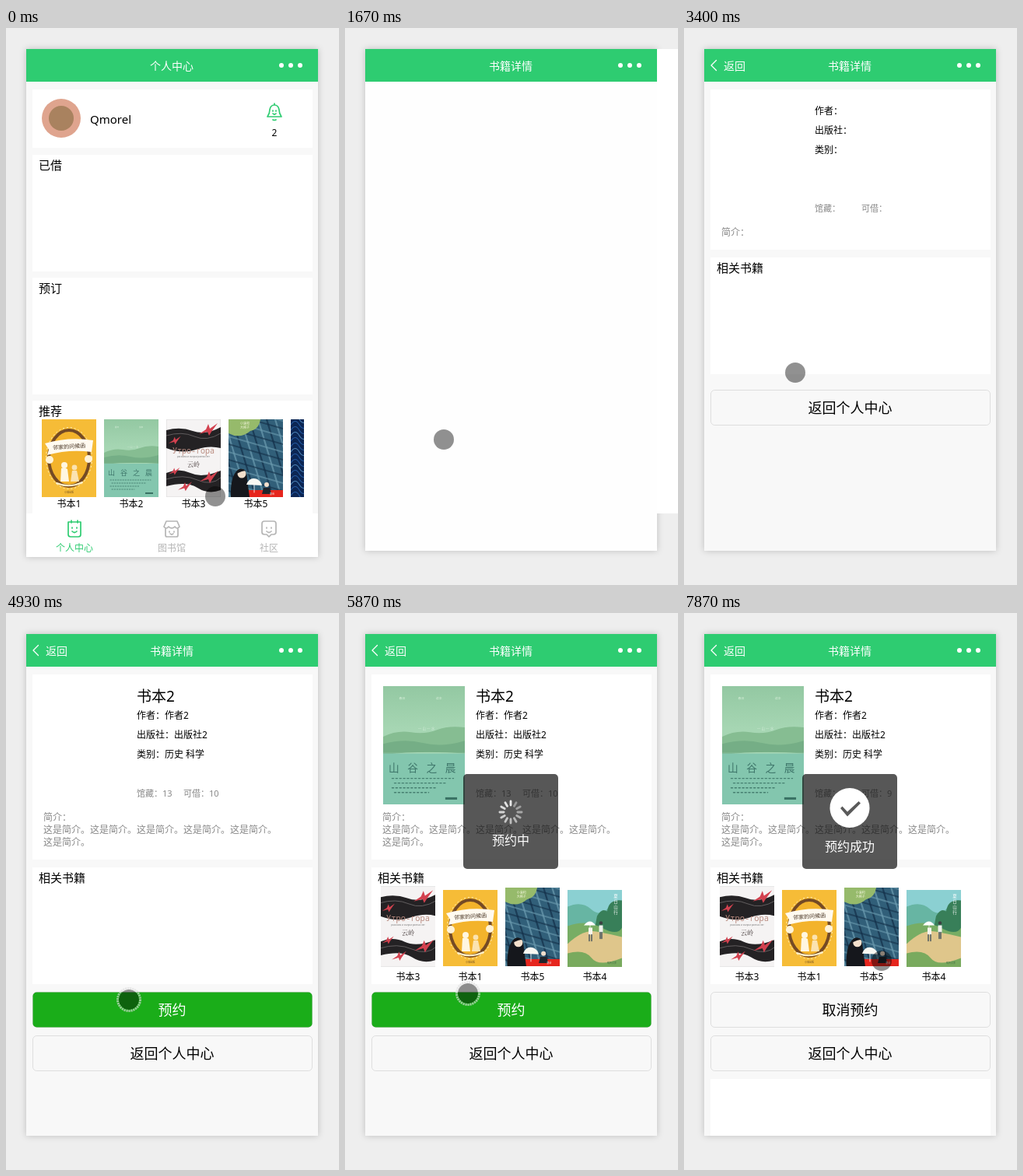
These frames come from a looping animation (428x716 px, 8 s). An HTML page:

```html
<!DOCTYPE html>
<html lang="zh-CN">
<head>
<meta charset="utf-8">
<title>图书馆</title>
<style>
html, body { margin: 0; width: 100%; height: 100%; overflow: hidden; background: #eee; }
svg { display: block; width: 428px; height: 716px; font-family: "Noto Sans", "Noto Sans CJK SC", "Noto Sans CJK", sans-serif; }
.frame { filter: drop-shadow(0 0 4px rgba(0,0,0,.2)); }
</style>
</head>
<body>
<svg id="stage" viewBox="0 0 428 716"></svg>
<script>
const LOOP = 8000;
const GREEN = '#2ecc71';
const stage = document.getElementById('stage');

const rect = (x, y, w, h, fill, more = '') => `<rect x="${x}" y="${y}" width="${w}" height="${h}" fill="${fill}" ${more}/>`;
const circle = (x, y, r, fill, more = '') => `<circle cx="${x}" cy="${y}" r="${r}" fill="${fill}" ${more}/>`;
const path = (d, fill, more = '') => `<path d="${d}" fill="${fill}" ${more}/>`;
const line = (d, color, w, more = '') => path(d, 'none', `stroke="${color}" stroke-width="${w}" stroke-linecap="round" stroke-linejoin="round" ${more}`);
const group = (id, body, more = '') => `<g id="${id}" ${more}>${body}</g>`;
// Text placed by the vertical centre of its glyphs
const text = (x, cy, size, s, fill = '#000', more = '') =>
  `<text x="${x}" y="${cy + size * 0.37}" font-size="${size}" fill="${fill}" ${more}>${s}</text>`;
const mid = (x, cy, size, s, fill, more = '') => text(x, cy, size, s, fill, `text-anchor="middle" ${more}`);
const card = (y, h) => rect(34, y, 360, h, '#fff');
const repeat = (n, f) => Array.from({ length: n }, (_, i) => f(i)).join('');

const cover = (n, body) =>
  `<symbol id="cover${n}" viewBox="0 0 70 100" preserveAspectRatio="xMidYMid slice">${body}</symbol>`;
const book = (n, x, y, w = 70, h = 100) => `<use href="#cover${n}" x="${x}" y="${y}" width="${w}" height="${h}"/>`;

const bird = (x, y, s) => path('M0 9L9 3L12 -4L14 2L24 -5L16 6L13 11L11 6Z', '#d3414f', `transform="translate(${x} ${y}) scale(${s})"`);

const covers =
  cover(1,
    rect(0, 0, 70, 100, '#f6bc37') +
    '<ellipse cx="35" cy="50" rx="26" ry="36" fill="#f3b32b" stroke="#744a25" stroke-width="4"/>' +
    '<ellipse cx="35" cy="50" rx="29.5" ry="39.5" fill="none" stroke="#fff1c8" stroke-width="1" stroke-dasharray="2 3"/>' +
    circle(10, 52, 5, '#fff3d8') + circle(60, 51, 5, '#fff3d8') +
    path('M4 31Q35 22 66 27L64 42Q35 38 7 46L9 39Z', '#fffaf0') +
    mid(35, 35, 7, '邻家的问候函', '#43301f', 'transform="rotate(-4 35 35)"') +
    circle(29, 59, 4, '#fff6e0') + path('M25 63Q29 61 33 64L35 80H24Z', '#fff6e0') +
    circle(42, 62, 3.4, '#fbe3b0') + path('M39 66H45L48 80H37Z', '#fbe3b0') +
    line('M19 82Q35 89 52 81', '#fff1c8', 2) +
    mid(35, 94, 3, '小城出版', '#6b4a20')) +
  cover(2,
    rect(0, 0, 70, 100, 'url(#mist)') +
    path('M0 43Q12 37 24 39T46 37T70 35V56H0Z', '#86bd92') +
    path('M0 49Q18 44 34 48T70 46V57Q34 54 0 58Z', '#6faa82', 'opacity=".75"') +
    rect(0, 57, 70, 43, '#83c6ae') +
    text(14, 10, 2.6, '春日', '#d8efda') + text(45, 10, 2.6, '读本', '#d8efda') +
    mid(37, 36, 3, '一 山 一 水', '#d0ead6') +
    mid(37, 69, 9, '山谷之晨', '#3f776b', 'letter-spacing="7"') +
    repeat(4, i => line(`M${8 + i % 2 * 2} ${78 + i * 4}H${60 - i * 7}`, '#467f70', 0.9, 'stroke-dasharray="1.4 1.8"')) +
    rect(53, 94, 10, 2, '#397163')) +
  cover(3,
    rect(0.3, 0.3, 69.4, 99.4, '#f5f3f3', 'stroke="#ddd" stroke-width=".6"') +
    path('M0 14Q18 9 34 15T70 10V37Q55 33 38 39T0 37Z', '#242224') +
    path('M0 69Q16 62 31 69T70 66V91Q54 97 40 88T0 86Z', '#242224') +
    line('M0 21Q20 15 36 22T70 18M0 77Q22 70 40 78T70 75', '#706b6c', 0.8) +
    bird(42, 10, 1) + bird(3, 25, 0.65) + bird(43, 71, 1) + bird(15, 84, 0.75) + bird(3, 65, 0.6) +
    mid(35, 40, 10, 'Утро-гора', '#b98b7f', 'font-family="Noto Sans Mono, monospace"') +
    mid(35, 48, 2.8, 'рассказы и очерки разных лет', '#777') +
    mid(35, 58, 8, '云岭', '#453b3b', 'font-family="Noto Serif, Noto Serif CJK SC, serif"')) +
  cover(5,
    rect(0, 0, 70, 100, '#315f79') +
    repeat(13, i => line(`M${i * 11 - 50} 0L${i * 11 - 20} 100`, i % 2 ? '#132f49' : '#6c9caf', 2.2, 'opacity=".7"')) +
    repeat(14, i => line(`M0 ${i * 10 - 18}L70 ${i * 10 + 2}`, i % 2 ? '#132f49' : '#6c9caf', 2, 'opacity=".6"')) +
    path('M0 0H41Q39 13 28 15Q15 26 0 18Z', '#96ba6b') +
    text(15, 6, 4, '小满和', '#f3f6dc') + text(15, 11, 4, '大格子', '#f3f6dc') +
    rect(24, 91, 46, 9, '#e6251d') +
    path('M3 100Q2 73 12 65Q23 60 24 77L27 100Z', '#15171c') +
    circle(17, 70, 5.5, '#f2dfcc') + path('M10 70Q12 60 22 66L17 67Z', '#15171c') +
    path('M23 84Q27 73 37 77Q42 80 43 85Z', '#f8f8f3') + line('M33 84V94', '#fff', 0.8) +
    circle(49, 84, 3, '#f2dfcc') + path('M45 88H53L55 96H43Z', '#20242b') +
    mid(56, 96, 3, '童话', '#fff')) +
  cover(4,
    rect(0, 0, 70, 100, '#8bd0d2') +
    path('M0 22Q18 14 30 25T53 23L70 14V59H0Z', '#67b5a3') +
    path('M38 34Q44 23 51 28Q53 12 70 14V65H32Z', '#387f59') +
    path('M0 47Q24 38 44 49T70 49V70H0Z', '#77ad64') +
    path('M0 70Q20 51 37 54T70 61V100H0Z', '#dfc68b') +
    path('M0 82Q22 76 31 88T70 88V100H0Z', '#79aa5e') +
    path('M21 46Q29 36 36 46Z', '#fff') + line('M29 45V50', '#fff', 0.7) +
    rect(27, 49, 5, 9, '#f7f6ee') + line('M28 58V66M31 58V66', '#41515d', 1.4) +
    circle(43, 43, 2.2, '#3b4242') + rect(40.5, 46, 5, 9, '#eef1ec') + line('M42 55V63M44 55V63', '#41515d', 1.4) +
    repeat(4, i => mid(62, 8 + i * 7, 5.5, '夏日山行'[i], '#fff')) +
    mid(57, 94, 3, '晴天文库', '#446b43')) +
  cover(6,
    rect(0, 0, 70, 100, '#0c2654') +
    repeat(16, i => line(`M0 ${i * 7}Q6 ${i * 7 - 9} 11 ${i * 7}T24 ${i * 7}`, i % 3 ? '#245aa3' : '#4c83b7', 1.1)));

const frame = h => rect(26, 27, 375, h, '#f8f8f8', 'class="frame"');
const tab = (x, label, color, icon) =>
  `<g transform="translate(${x} 644)">${line(icon, color, 1.7)}</g>` + mid(x, 669, 12, label, color);
const smile = 'M-3 -2V-1M3 -2V-1M-3 3Q0 6 3 3';

const home = frame(653) +
  card(79, 75) + card(163, 150) + card(321, 150) + card(479, 150) +
  circle(71, 116, 25, '#dfa48e') + circle(71, 116, 16, '#a9825f') +
  text(108, 117, 15, 'Qmorel') +
  `<g transform="translate(345 108)">` +
    line('M-9 6Q-6 2 -6 -3Q-5 -9 0 -9Q5 -9 6 -3Q6 2 9 6ZM0 -9V-11M-2 10Q0 11 2 10M-2 -2V-1M2 -2V-1M-2 2Q0 4 2 2', GREEN, 1.7) + '</g>' +
  mid(345, 135, 12, '2') +
  text(42, 176, 15, '已借') + text(42, 334, 15, '预订') + text(42, 492, 15, '推荐') +
  `<g clip-path="url(#row)">` + [1, 2, 3, 5, 6].map((n, i) => book(n, 46 + i * 80, 503)).join('') + '</g>' +
  [1, 2, 3, 5].map((n, i) => mid(81 + i * 80, 612, 12, '书本' + n)).join('') +
  rect(26, 624, 375, 56, '#fff') +
  tab(88, '个人中心', GREEN, 'M-8 -9H8V7Q8 10 5 10H-5Q-8 10 -8 7ZM-4 -11V-8M4 -11V-8M-3 -2V-1M3 -2V-1M-3 3Q0 6 3 3') +
  tab(213, '图书馆', '#b5b5b5', 'M-7 -10H7L10 -3Q7 1 4 -3Q0 1 -4 -3Q-7 1 -10 -3ZM-8 0V8Q-8 10 -6 10H6Q8 10 8 8V0M-3 3V4M3 3V4M-2 6Q0 8 2 6') +
  tab(338, '社区', '#b5b5b5', 'M-6 -10H6Q9 -10 9 -7V4Q9 7 6 7H3L0 10L-3 7H-6Q-9 7 -9 4V-7Q-9 -10 -6 -10Z' + smile);

const button = (y, label, fill = '#f8f8f8', ink = '#000') =>
  rect(34.5, y + 0.5, 359, 45, fill, 'rx="5" stroke="#000" stroke-opacity=".1"') + mid(213.5, y + 23.5, 18, label, ink);
const info = (y, who, press, kind) =>
  text(168, y, 12, '作者：' + who) + text(168, y + 25, 12, '出版社：' + press) + text(168, y + 50, 12, '类别：' + kind);
const GREY = '#888';
const page = rect(26, 69, 375, 603, '#f8f8f8');
const intro = '这是简介。';

const empty = page + card(79, 206) + info(106.5, '', '', '') +
  text(168, 232, 11, '馆藏：', GREY) + text(228, 232, 11, '可借：', GREY) + text(48, 263, 12, '简介：', GREY) +
  card(295, 150) + text(42, 308, 15, '相关书籍') + button(465, '返回个人中心');

const loaded = page + card(79, 238) +
  text(168, 107, 19, '书本2') + info(131.5, '作者2', '出版社2', '历史 科学') +
  text(168, 232, 11, '馆藏：13', GREY) + text(228, 232, 11, '可借：<tspan id="left"></tspan>', GREY) +
  text(48, 263, 12, '简介：', GREY) + text(48, 279, 12, intro.repeat(5), GREY) + text(48, 295, 12, intro, GREY) +
  group('mainCover', book(2, 49, 94, 105, 152)) +
  card(327, 150) + text(42, 340, 15, '相关书籍') +
  group('related',
    book(3, 46, 351, 70, 104) + book(1, 126, 356, 70, 98) + book(5, 206, 353, 70, 101) + book(4, 286, 356, 70, 99) +
    [3, 1, 5, 4].map((n, i) => mid(81 + i * 80, 468, 12, '书本' + n)).join('')) +
  group('reserve', button(487, '预约', '#1aad19', '#fff')) +
  group('cancel', button(487, '取消预约')) +
  button(543, '返回个人中心') +
  group('extra', card(599, 73));

const shade = i => i ? 144 + i * 7.5 : 233;
const blades = repeat(12, i => {
  const c = shade(i);
  return rect(-1.4, -15.5, 2.8, 8, `rgb(${c},${c},${c})`, `rx="1.4" transform="rotate(${i * 30})"`);
});

const toast = rect(152, 207, 122, 122, '#111', 'rx="5" opacity=".7"') +
  group('busy', `<g transform="translate(213 256)">${group('spinner', blades)}</g>` + mid(213, 292, 16, '预约中', '#fff')) +
  group('done', circle(213, 250.5, 25.5, '#fff') +
    path('M201 251L203.5 248.5L210 255.5L224.5 242L227 244.5L210 261.5Z', '#5a5a5a') + mid(213, 300.5, 16, '预约成功', '#fff'));

stage.innerHTML =
  `<defs><linearGradient id="mist" x2="0" y2="1"><stop stop-color="#93c8a2"/><stop offset=".36" stop-color="#a6d6b3"/></linearGradient>
  <clipPath id="row">${rect(46, 490, 337, 130, '#000')}</clipPath>${covers}</defs>` +
  rect(0, 0, 428, 716, '#eee') +
  group('home', home) +
  group('detail', frame(645) + rect(26, 69, 375, 603, '#fefefe') + group('slide', rect(401, 27, 375, 597, '#fff')) +
    group('empty', empty) + group('loaded', loaded)) +
  rect(26, 27, 375, 42, GREEN) +
  group('back', line('M41.5 41.5L35 48L41.5 54.5', '#fff', 1.3) + text(51, 48.5, 14, '返回', '#fff')) +
  mid(213, 48.5, 14, '<tspan id="title"></tspan>', '#fff') +
  repeat(3, i => circle(354 + i * 12, 48, 3, '#fff')) +
  group('toast', toast) +
  group('cursor', circle(0, 0, 13, '#000', 'opacity=".43"') +
    group('ring', circle(0, 0, 14.5, 'none', 'stroke="#ddd" stroke-width="3" stroke-dasharray="2.2 .8" opacity=".65"')));

const ui = {};
stage.querySelectorAll('g[id], tspan[id]').forEach(e => ui[e.id] = e);

// Pointer path: time, x, y
const track = [
  [0, 269, 602], [20, 269, 602], [330, 118, 525], [640, 118, 525], [670, 120, 528], [730, 127, 529],
  [1670, 127, 529], [2470, 138, 434], [3340, 138, 434], [3400, 143, 443], [3720, 167, 478], [4070, 158, 497],
  [5200, 158, 497], [5530, 158, 489], [6400, 158, 489], [6470, 158, 482], [7340, 158, 482],
  [7630, 385, 85], [7870, 254, 447], [LOOP, 254, 447]
];
const clamp = v => Math.min(1, Math.max(0, v));
const ease = (t, from, to) => { const p = clamp((t - from) / (to - from)); return p * p * (3 - 2 * p); };

function pointer(t) {
  const i = Math.max(1, track.findIndex(k => k[0] > t));
  const [a, b] = [track[i - 1], track[i]];
  const p = (t - a[0]) / (b[0] - a[0]);
  return [a[1] + (b[1] - a[1]) * p, a[2] + (b[2] - a[2]) * p];
}
const show = (name, on) => ui[name].setAttribute('display', on ? 'inline' : 'none');

function render(t) {
  const opened = t >= 1665, ready = t >= 4925, success = t >= 7060, updated = t >= 7125;
  show('home', !opened);
  show('detail', opened);
  ui.title.textContent = opened ? '书籍详情' : '个人中心';
  ui.slide.setAttribute('transform', `translate(${-375 * ease(t, 1670, 2100)})`);
  ui.back.setAttribute('opacity', ease(t, 1680, 2100));
  ui.empty.setAttribute('opacity', ease(t, 2700, 3130));
  show('empty', !ready);
  show('loaded', ready);
  show('mainCover', t >= 5200);
  show('related', t >= 5270);
  show('reserve', !success);
  show('cancel', success);
  show('extra', updated);
  ui.left.textContent = updated ? '9' : '10';
  show('toast', t >= 5665);
  show('busy', !success);
  show('done', success);
  ui.spinner.setAttribute('transform', `rotate(${Math.floor((t - 5865) * 12 / 1000) * 30})`);
  ui.cursor.setAttribute('transform', `translate(${pointer(t)})`);
  show('ring', (t >= 665 && t < 725) || (t >= 4925 && t < 6465));
}

let start;
function tick(now) {
  start ??= now;
  render((now - start) % LOOP);
  requestAnimationFrame(tick);
}
render(0);
requestAnimationFrame(tick);
</script>
</body>
</html>
```
